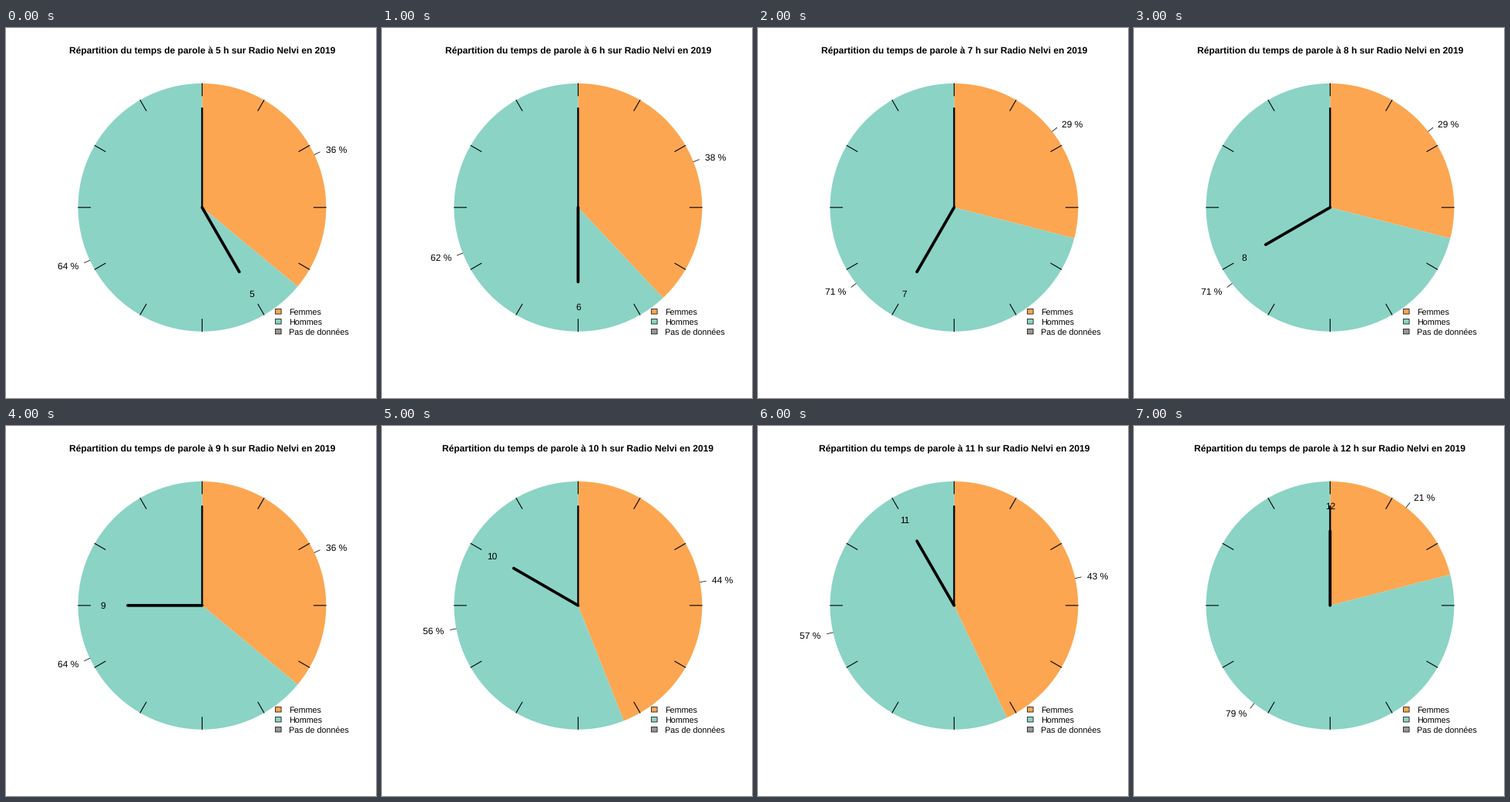
A matplotlib script that plays this animation: 480x480 px, repeating every 8 s.

```python
import math

import matplotlib.pyplot as plt
from matplotlib.animation import FuncAnimation
from matplotlib.patches import Polygon, Rectangle

plt.rcParams["font.family"] = "Liberation Sans"
plt.rcParams["text.hinting"] = "none"

SIZE = 480
CX, CY, R = 254.4, 232.8, 160.89
ORANGE, TEAL, GRAY = "#fca651", "#8bd3c5", "#999999"
FIRST_HOUR = 5
WOMEN = [36, 38, 29, 29, 36, 44, 43, 21]  # percent for each hour
HALF_CAP = 4.3  # shifts a baseline so that digits sit centred

fig = plt.figure(figsize=(SIZE / 72, SIZE / 72), dpi=72, facecolor="white")
ax = fig.add_axes([0, 0, 1, 1])
ax.set_xlim(0, SIZE)
ax.set_ylim(SIZE, 0)
ax.axis("off")


def polar(turn, radius):
    """Point at a clockwise fraction of a turn from twelve o'clock."""
    a = 2 * math.pi * turn
    return CX + R * radius * math.sin(a), CY - R * radius * math.cos(a)


def slice_points(start, end):
    n = max(2, math.floor(200 * (end - start)))
    arc = [polar(start + (end - start) * i / (n - 1), 1) for i in range(n)]
    return arc + [(CX, CY)]


def spoke(turn, inner, outer):
    return tuple(zip(polar(turn, inner), polar(turn, outer)))


def add_line(width, z, turn=0, inner=0, outer=1):
    xs, ys = spoke(turn, inner, outer)
    return ax.plot(xs, ys, color="black", lw=width, zorder=z, snap=False,
                   solid_capstyle="round")[0]


def add_text(x, y, text="", size=12, **kw):
    return ax.text(x, y, text, fontsize=size, color="black", va="baseline",
                   zorder=6, **kw)


def add_slice(color):
    patch = Polygon([(CX, CY)] * 3, facecolor=color, edgecolor="none",
                    lw=0, zorder=1, snap=False)
    return ax.add_patch(patch)


women, men = add_slice(ORANGE), add_slice(TEAL)

for k in range(12):
    add_line(1.1, 3, k / 12, 0.9, 1)
add_line(2.25, 4, 0, 0, 0.8)
hour_hand = add_line(3.75, 5)

leaders = [add_line(0.75, 3) for _ in range(2)]
labels = [add_text(0, 0, ha=side) for side in ("left", "right")]
hour_label = add_text(0, 0, ha="center")
title = add_text(CX, 34, ha="center", weight="bold")

legend = [("Femmes", ORANGE), ("Hommes", TEAL), ("Pas de données", GRAY)]
for row, (name, color) in enumerate(legend):
    y = 367.8 + 12.96 * row
    ax.add_patch(Rectangle((349.3, y - 3.24), 7.78, 6.48, facecolor=color,
                           edgecolor="black", lw=0.75, zorder=4, snap=False))
    add_text(366.7, y + 4.4, name, 10.8)


def update(i):
    hour, share = FIRST_HOUR + i, WOMEN[i]
    cut = share / 100
    women.set_xy(slice_points(0, cut))
    men.set_xy(slice_points(cut, 1))

    parts = ((cut / 2, share), ((1 + cut) / 2, 100 - share))
    for leader, label, (middle, value) in zip(leaders, labels, parts):
        leader.set_data(*spoke(middle, 1, 1.05))
        x, y = polar(middle, 1.1)
        label.set_position((x, y + HALF_CAP))
        label.set_text(f"{value} %")

    hour_hand.set_data(*spoke(hour / 12, 0, 0.6))
    x, y = polar(hour / 12, 0.8)
    hour_label.set_position((x, y + HALF_CAP))
    hour_label.set_text(str(hour))
    title.set_text(f"Répartition du temps de parole à {hour} h "
                   "sur Radio Nelvi en 2019")
    return []


anim = FuncAnimation(fig, update, frames=len(WOMEN), interval=1000,
                     init_func=lambda: update(0), repeat=True, repeat_delay=0)
plt.show()
```
